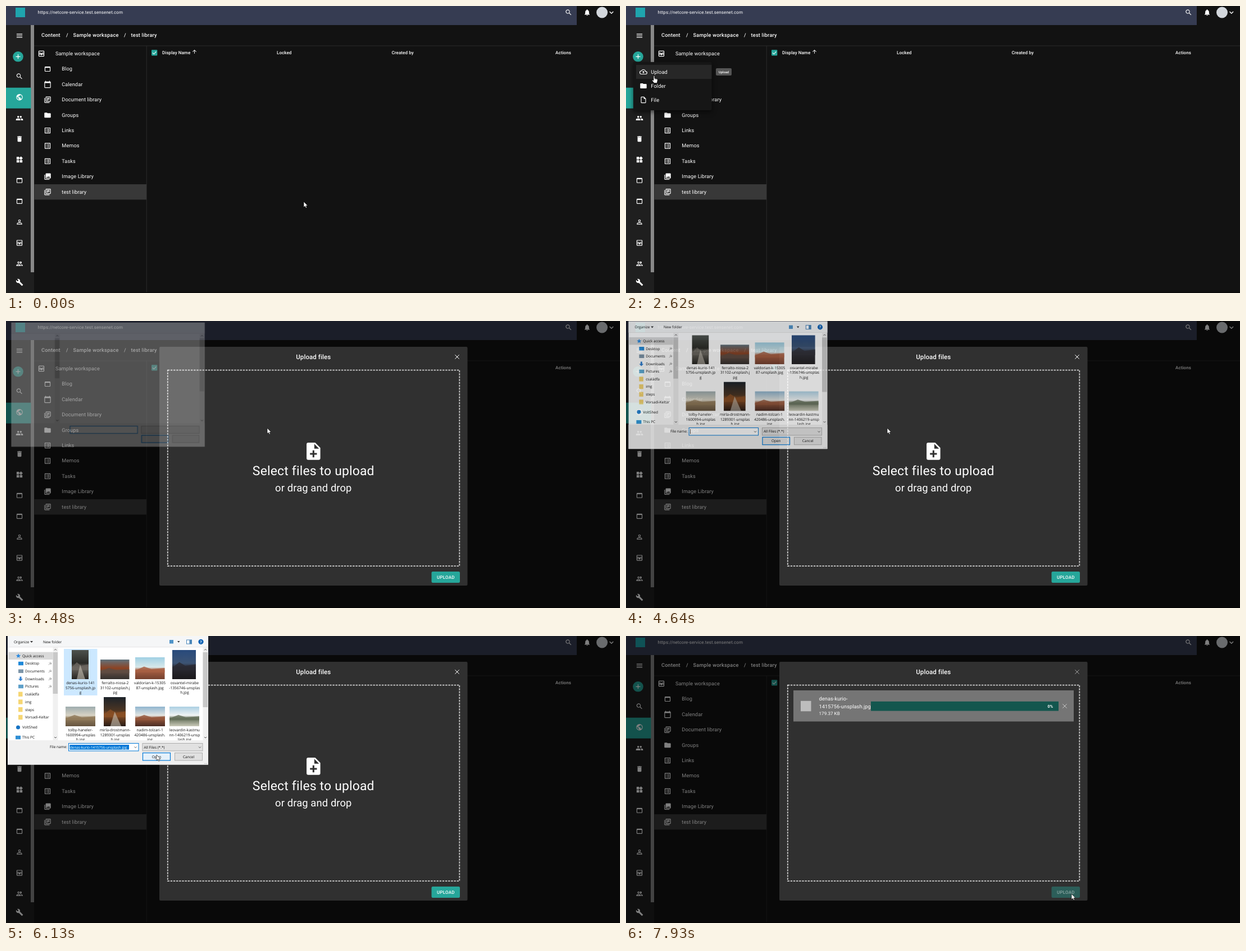
An HTML page for the animation above (8 s loop, 1093x512 px).

```html
<!DOCTYPE html>
<html lang="en">
<head>
<meta charset="utf-8">
<title>Upload to library</title>
<style>
  html, body { margin: 0; width: 100%; height: 100%; overflow: hidden; background: #121212; }
  svg { display: block; width: 100vw; height: 100vh; fill: #fff; font-family: Roboto, sans-serif; text-rendering: geometricPrecision; }
  text { white-space: pre; letter-spacing: .009em; }
  .crumb { letter-spacing: .025em; }
  .m { font-weight: 500; }
  .c { text-anchor: middle; }
  .e { text-anchor: end; }
  .line { fill: none; stroke: #fff; }
  #picker text { font-family: "Open Sans", sans-serif; letter-spacing: 0; fill: #111; }
  #menu { filter: drop-shadow(0 3px 4px rgba(0, 0, 0, .6)); }
</style>
</head>
<body>
<svg id="stage" viewBox="0 0 1093 512"></svg>
<script>
const LOOP = 8000;

// --- drawing helpers -------------------------------------------------
const rect = (x, y, w, h, fill, extra = '') =>
  `<rect x="${x}" y="${y}" width="${w}" height="${h}" fill="${fill}" ${extra}/>`;
const text = (x, y, size, str, cls = '', extra = '') =>
  `<text x="${x}" y="${y}" font-size="${size}" class="${cls}" ${extra}>${str}</text>`;
const path = (d, extra = '') => `<path d="${d}" ${extra}/>`;
const line = (d, width = 1, extra = '') => path(d, `class="line" stroke-width="${width}" ${extra}`);
const group = (id, inner, extra = '') => `<g id="${id}" ${extra}>${inner}</g>`;
const cross = (x, y, r, extra = '') =>
  line(`M${x - r} ${y - r}l${2 * r} ${2 * r}m0 ${-2 * r}l${-2 * r} ${2 * r}`, 1, extra);

const shapes = {
  menu: 'M3 6h18v2H3zm0 5h18v2H3zm0 5h18v2H3z',
  search: 'M9.5 3a6.5 6.5 0 0 1 5.2 10.3l5.8 5.7-1.5 1.5-5.7-5.8A6.5 6.5 0 1 1 9.5 3zm0 2a4.5 4.5 0 1 0 0 9 4.5 4.5 0 0 0 0-9z',
  globe: 'M12 2a10 10 0 1 0 0 20 10 10 0 0 0 0-20zm-1 17.9A8 8 0 0 1 4.2 10.200L9 15v1q0 2 2 2zm6.900-2.500q-.5-1.400-1.900-1.400h-1v-3q0-1-1-1H8v-2h2q1 0 1-1V7h2q2 0 2-2v-.4a8 8 0 0 1 2.900 12.800z',
  people: 'M16 5a3 3 0 1 1 0 6 3 3 0 0 1 0-6zM8 5a3 3 0 1 1 0 6 3 3 0 0 1 0-6zm0 8q7 .3 7 3.500V19H1v-2.500Q1 13.300 8 13zm8 0q7 .3 7 3.500V19h-6v-2.500q0-2-2-3.450z',
  trash: 'M6 7h12v12q0 2-2 2H8q-2 0-2-2zM5 4h3.500l1-1h5l1 1H19v2H5z',
  widgets: 'M13 13h8v8h-8zM3 13h8v8H3zM3 3h8v8H3zm13.700-1.300l5.600 5.600-5.600 5.700L11 7.300z',
  pane: 'M5 4h14q2 0 2 2v12q0 2-2 2H5q-2 0-2-2V6q0-2 2-2zm0 4v10h14V8z',
  person: 'M12 4a4 4 0 1 1 0 8 4 4 0 0 1 0-8zm0 2a2 2 0 1 0 0 4 2 2 0 0 0 0-4zm0 7q8 .4 8 4v3H4v-3q0-3.600 8-4zm0 1.900q-6 .4-6 2.100v1h12v-1q0-1.700-6-2.100z',
  inbox: 'M5 3h14q2 0 2 2v14q0 2-2 2H5q-2 0-2-2V5q0-2 2-2zm0 2v4h5a2 2 0 0 0 4 0h5V5zm0 6v2h14v-2h-3.500a4 4 0 0 1-7 0zm0 4v4h14v-4h-5a2 2 0 0 1-4 0z',
  team: 'M9 5a3.500 3.500 0 1 1 0 7 3.500 3.500 0 0 1 0-7zm0 2a1.500 1.500 0 1 0 0 3 1.500 1.500 0 0 0 0-3zm0 6.700q7 .4 7 3.500V19H2v-1.800q0-3.100 7-3.500zM4.300 17h9.400Q9 14.500 4.300 17zM15 5a3.500 3.500 0 1 1-1.500 6.600q2-3.100 0-6.200zm1 8.800q6 .8 6 3.400V19h-4v-1.800q0-2-2-3.400z',
  wrench: 'M22.700 19l-9.100-9.100q1.300-4-1.500-6.900Q8.800 0 4.700 1.700L9 6 6 9 1.600 4.700Q0 8.800 2.900 12.100q2.900 2.800 6.900 1.500l9.100 9.100q.7.600 1.400 0l2.300-2.300q.7-.7.100-1.400z',
  bell: 'M10 20h4q0 2-2 2t-2-2zm8-9v5l2 2v1H4v-1l2-2v-5q0-5 4.500-6.300V4a1.500 1.500 0 0 1 3 0v.7Q18 6 18 11z',
  calendar: 'M5 1h2v2h10V1h2v2h1q2 0 2 2v16q0 2-2 2H4q-2 0-2-2V5q0-2 2-2h1zM4 8v13h16V8z',
  books: 'M2 6h2v14h14v2H4q-2 0-2-2zm6-4h12q2 0 2 2v12q0 2-2 2H8q-2 0-2-2V4q0-2 2-2zm0 2v12h12V4zm2 2h8v2h-8zm0 3h8v2h-8zm0 3h4v2h-4z',
  folder: 'M4 4h6l2 2h8q2 0 2 2v10q0 2-2 2H4q-2 0-2-2V6q0-2 2-2z',
  list: 'M4 3h16q1 0 1 1v16q0 1-1 1H4q-1 0-1-1V4q0-1 1-1zm1 2v14h14V5zm2 2h2v2H7zm4 0h6v2h-6zm-4 4h2v2H7zm4 0h6v2h-6zm-4 4h2v2H7zm4 0h6v2h-6z',
  images: 'M2 6h2v14h14v2H4q-2 0-2-2zm6-4h12q2 0 2 2v12q0 2-2 2H8q-2 0-2-2V4q0-2 2-2zm3 10l-3 4h12l-4-5-3 3.700z',
  up: 'M12 4l8 8-1.400 1.400L13 7.800V20h-2V7.800l-5.600 5.600L4 12z',
  cloud: 'M6 20a6 6 0 0 1-.6-12 7.500 7.500 0 0 1 14 2A5 5 0 0 1 19 20zm0-2h13a3 3 0 0 0 .2-6l-1.500-.1-.3-1.500A5.500 5.500 0 0 0 7.100 9l-.5.900-1 .1A4 4 0 0 0 6 18zm2-5l4-4 4 4h-2.500v3h-3v-3z',
  file: 'M6 2h8l6 6v12q0 2-2 2H6q-2 0-2-2V4q0-2 2-2zm0 2v16h12V9h-5V4z',
  addFile: 'M6 2h8l6 6v12q0 2-2 2H6q-2 0-2-2V4q0-2 2-2zm7 1.500V9h5.500zM11 11v3H8v2h3v3h2v-3h3v-2h-3v-3z'
};
const icon = (name, cx, cy, size = 13.7, extra = '') =>
  `<path d="${shapes[name]}" fill-rule="evenodd" transform="translate(${cx - size / 2} ${cy - size / 2}) scale(${size / 24})" ${extra}/>`;

// --- page ------------------------------------------------------------
function page() {
  const rail = ['people', 'trash', 'widgets', 'pane', 'pane', 'person', 'inbox', 'team'];
  const tree = [['pane', 'Blog'], ['calendar', 'Calendar'], ['books', 'Document library'], ['folder', 'Groups'],
    ['list', 'Links'], ['list', 'Memos'], ['list', 'Tasks'], ['images', 'Image Library'], ['books', 'test library']];
  const columns = [[278, 'Display Name'], [482, 'Locked'], [686.5, 'Created by'], [978, 'Actions']];
  const crumbs = [[63, 'Content'], [107, '/'], [119.5, 'Sample workspace'], [210, '/'], [222.5, 'test library']];
  return rect(0, 0, 1093, 512, '#121212') + rect(0, 0, 1016, 34, '#363c52') + rect(0, 34, 50, 478, '#1f1f1f') +
    rect(44, 34, 6, 441, '#888') + rect(17, 3, 17, 17, '#1fa5ae') +
    text(56.5, 14, 8, 'https://netcore-service.test.sensenet.com') +
    icon('search', 1001.5, 11.5) + icon('bell', 1034.5, 11.5) +
    '<circle cx="1061" cy="11.500" r="10" fill="#d3d7dc"/>' + line('M1074.500 10l3.300 3.300 3.300-3.300', 1.3) +
    crumbs.map(([x, s]) => text(x, 55.3, 9.14, s, 'm crumb')).join('') +
    rect(50, 70.5, 1043, 1, '#2b2b2b') + rect(249.7, 71, 1, 440, '#2b2b2b') + rect(50, 510.5, 1043, 1, '#080808') +
    icon('menu', 24, 53) + rect(0, 72, 44.5, 37, '#333', 'id="addHover"') +
    '<circle cx="21.500" cy="90.300" r="9.300" fill="#26a69a"/>' + line('M17.500 90.300h8m-4-4v8', 1.2) +
    icon('search', 24, 125.5) + rect(0, 145.7, 44.5, 37, '#26a69a') + icon('globe', 24, 162.7) +
    rail.map((name, i) => icon(name, 24, 200 + i * 37.1)).join('') + icon('wrench', 24, 493) +
    rect(50.5, 318, 199.5, 27.4, '#383838') + icon('inbox', 63, 85) + text(88, 88, 9.2, 'Sample workspace') +
    tree.map(([name, s], i) => icon(name, 74, 112.5 + i * 27.4) + text(99.3, 115.4 + i * 27.4, 9.2, s)).join('') +
    rect(259, 78.3, 10.3, 10.3, '#26a69a', 'rx="1"') + line('M261 83.500l2.300 2.300 4-4.500', 1.1) +
    icon('up', 335.5, 81.5, 10.5) +
    columns.map(([x, s]) => text(x, 86.4, 8, s, 'm')).join('');
}

const tooltip = (id, x, y, w, label) =>
  group(id, rect(x, y, w, 13, '#555', 'rx="2"') + text(x + w / 2, y + 8.6, 5.7, label, 'm c'));

function menu() {
  const rows = [['cloud', 'Upload'], ['folder', 'Folder'], ['file', 'File']];
  return rect(13, 100, 139.5, 86, '#161616', 'rx="2"') + rect(18, 105, 134.5, 25, '#272727', 'id="menuHover"') +
    rows.map(([name, s], i) => icon(name, 31, 117.5 + i * 25) + text(44.3, 120.6 + i * 25, 9.3, s)).join('');
}

function dialog() {
  return rect(273, 46, 548.5, 426, '#303030', 'rx="2"') + text(547.3, 67.8, 11.43, 'Upload files', 'm c') +
    group('dialogClose', cross(803, 64, 3.7)) +
    rect(287.8, 87.5, 519.5, 349.5, 'none', 'stroke="#d0d0d0" stroke-width="1.750" stroke-dasharray="3.400 1.750"') +
    group('prompt', icon('addFile', 547.3, 232.4, 36.8) +
      text(547.3, 275.4, 22.85, 'Select files to upload', 'c') + text(547.3, 303.7, 18.28, 'or drag and drop', 'c')) +
    group('queued', rect(298, 97, 499, 43, '#757575') + rect(311, 109, 18.5, 18.5, '#bdbdbd') +
      text(343.5, 117, 9.2, 'denas-kurio-1415756-unsplash.jpg') + text(343.5, 130, 8, '179.37 KB') + cross(781, 118.5, 3.7)) +
    group('sending', rect(298, 97, 499, 55.5, '#757575') + rect(311, 115.8, 18.5, 18.5, '#bdbdbd') +
      text(343.5, 115.4, 9.2, 'denas-kurio-') + text(343.5, 129, 9.2, '1415756-unsplash.jpg') +
      text(343.5, 141.2, 8, '179.37 KB') + rect(436, 116.8, 334, 16.8, '#13564e') +
      text(755.3, 127.7, 7.2, '0%', 'c', 'font-weight="700"') + cross(781, 125, 3.7, 'opacity=".6"')) +
    rect(757.5, 447, 50.5, 20, '#26a69a', 'id="sendButton" rx="2.300"') +
    text(782.8, 459.7, 8, 'UPLOAD', 'm c crumb', 'id="sendLabel"');
}

// --- file picker -----------------------------------------------------
const photos = [
  { box: [117, 25, 30, 52], tones: ['#4d524c', '#2b2c27', '#6b675f', '#24231f'], name: ['denas-kurio-141', '5756-unsplash.jp', 'g'] },
  { box: [168, 42, 51.5, 35], tones: ['#60727c', '#8d4222', '#5f4c42', '#35302e'], name: ['ferralto-niosa-2', '31102-unsplash.j', 'pg'] },
  { box: [230, 38, 52.5, 39], tones: ['#a0d0e4', '#d7e8ea', '#a85f43', '#74412f'], name: ['valdorian-k-15305', '87-unsplash.jpg', ''] },
  { box: [296, 25, 42, 52], tones: ['#284a7c', '#3d5474', '#2a2a32', '#1b191b'], name: ['osvantel-mirabe', '-1356746-unsplas', 'h.jpg'] },
  { box: [106, 126, 53, 35], tones: ['#9eacae', '#d8d3c4', '#917b5b', '#655440'], name: ['tolby-haneler-', '1600994-unsplas', 'h.jpg'] },
  { box: [174, 109, 39, 52], tones: ['#1d232a', '#4b3523', '#8a4f25', '#271b15'], name: ['mirla-drostmann-', '1289301-unsplas', 'h.jpg'] },
  { box: [230, 126, 53, 35], tones: ['#90b5cf', '#e4e6e2', '#96583c', '#4a2c24'], name: ['nadim-tolzari-1', '420486-unsplash.', 'jpg'] },
  { box: [291, 126, 53, 35], tones: ['#abcfe2', '#f1f4f4', '#65705a', '#c9c9b8'], name: ['leovardin-kastmu', 'nn-1406219-unsp', 'lash.jpg'] }
];

function photo({ box: [x, y, w, h], tones, name }, i) {
  const cx = 132.5 + (i % 4) * 61.8, top = i < 4 ? 86 : 170;
  const stops = tones.map((c, k) => `<stop offset="${[0, .45, .6, 1][k]}" stop-color="${c}"/>`).join('');
  return `<linearGradient id="tone${i}" x2="0" y2="1">${stops}</linearGradient>` + rect(x, y, w, h, `url(#tone${i})`) +
    path(`M${x} ${y + h * .6}l${w * .3} ${-h * .18} ${w * .25} ${h * .12} ${w * .45} ${-h * .05}v${h * .2}H${x}z`, `fill="${tones[2]}" opacity=".8"`) +
    (i % 5 ? '' : path(`M${x + w * .5} ${y + h * .5}l${w * .3} ${h * .5}h${-w * .5}z`, 'fill="#c5bfb2" opacity=".6"')) +
    name.map((s, k) => text(cx, top + k * 8.5, 6.7, s, 'c')).join('');
}

const chevron = (x, y, d = 1, color = '#444') => line(`M${x - 2} ${y - d}l2 ${2 * d} 2 ${-2 * d}`, .9, `style="stroke:${color}"`);

function picker() {
  const places = [['Quick access', '#2d8be0', 35.3], ['Desktop', '#1e88d8', 49], ['Documents', '#7d95a8', 62.7], ['Downloads', '#2f7fd0', 76.4],
    ['Pictures', '#5d9fc9', 90], ['családfa', '#f6d673', 103.8], ['img', '#f6d673', 117.5], ['steps', '#f6d673', 131.2],
    ['Vorsadi-Keltar', '#f6d673', 145], ['VoltShed', '#1673c4', 163], ['This PC', '#2f8fd4', 181]];
  const place = ([s, color, y], i) => {
    const inset = i > 0 && i < 9 ? 34 : 29;
    const mark = i === 9 ? `<circle cx="21.500" cy="${y}" r="3.500" fill="${color}"/>`
      : i === 0 ? path(`M22 ${y - 4}l1.200 2.800 3 .2-2.300 1.900.8 2.900-2.700-1.600-2.700 1.600.8-2.900-2.300-1.900 3-.2z`, `fill="${color}"`)
      : i === 3 ? path(`M24.500 ${y - 4}h3v4h2.500l-4 4-4-4h2.500z`, `fill="${color}"`)
      : rect(inset - 12, y - (i > 4 && i < 9 ? 4.2 : 3.2), i > 4 && i < 9 ? 7.5 : 9, i > 4 && i < 9 ? 8.4 : 6.5, color);
    const pin = i > 0 && i < 5 ? line(`M76 ${y + 2.500}l2-2m-1-2l3 3m-1.500-4l2.500 2.500-2 1`, 1, 'style="stroke:#8a8a8a"') : '';
    return mark + text(inset, y + 2.3, 6.5, s) + pin;
  };
  const frame = rect(3, 0, 357, 229.5, '#fff') + rect(3, 0, 357, 20, '#f5f6f7') + rect(3, 19.5, 357, .7, '#ddd') +
    rect(83.5, 20, 9, 166, '#f0f0f0') + rect(83.5, 29, 8.5, 74, '#c8c8c8') + chevron(88, 24.5, -1) + chevron(88, 181) +
    rect(350.5, 20, 9, 166, '#f0f0f0') + rect(350.5, 29, 8.5, 98, '#c8c8c8') + chevron(355, 24.5, -1) + chevron(355, 181) +
    rect(3, 186, 357, 43.5, '#f0f0f0') + rect(111.5, 191.5, 124.5, 13.5, '#fff', 'stroke="#0078d7"') +
    rect(243, 191.5, 107, 13.5, '#e1e1e1', 'stroke="#adadad"') +
    rect(243.5, 208.5, 49, 13.5, '#e1e1e1', 'id="openButton" stroke="#0078d7" stroke-width="1.200"') +
    rect(300.5, 208.5, 49, 13.5, '#e1e1e1', 'stroke="#adadad"');
  const content = text(14, 12.8, 6.5, 'Organize') + path('M43 9h5l-2.500 3z', 'fill="#333"') + text(66, 12.8, 6.5, 'New folder') +
    rect(291, 7, 7, 6.5, '#4f93c8') + path('M305 9h4.500l-2.200 2.800z', 'fill="#333"') +
    rect(321.5, 7, 9, 7, '#fff', 'stroke="#4784b8"') + rect(326.5, 7, 4, 7, '#4784b8') +
    '<circle cx="347" cy="10.300" r="4.600" fill="#0e63b5"/>' + text(347, 12.8, 6.5, '?', 'c', 'style="fill:#fff;font-weight:700"') +
    rect(4, 28.6, 79, 13.5, '#d9d9d9') + `<g clip-path="url(#listing)">` + places.map(place).join('') +
    rect(164.5, 23, 59.5, 83, '#e5f3ff', 'id="hoverCell"') + rect(103, 23, 59.5, 83, '#e5f3ff', 'id="firstCell"') +
    photos.map(photo).join('') + '</g>' +
    text(109, 200.3, 6.5, 'File name:', 'e') + rect(113.7, 194, .7, 8.5, '#000', 'id="caret"') +
    group('fileName', rect(113.5, 194, 105.5, 8.7, '#0078d7') +
      text(114, 200.7, 6.3, 'denas-kurio-1415756-unsplash.jpg', '', 'style="fill:#fff"')) + chevron(230.5, 198.5) +
    text(245.5, 200.5, 6.5, 'All Files (*.*)') + chevron(345, 198.5) +
    text(268, 217.7, 6.5, 'Open', 'c') + text(325, 217.7, 6.5, 'Cancel', 'c') +
    [0, 1, 2].map(i => rect(357 - i * 2, 227, 1, 1, '#aaa')).join('');
  return '<clipPath id="listing"><rect x="3" y="20" width="347" height="166"/></clipPath>' + frame + group('pickerContent', content);
}

const pointer = group('arrow', path('M0 0v10l2.300-2.100 1.500 3.400 1.700-.7L4 7.300h3z', 'stroke="#000" stroke-width=".6"')) +
  group('hand', path('M-1 1q1-1.600 2 0v4l4 1q1.500.5 1.300 2l-1 5.500H0l-3.200-4.200q-.5-1.400.7-1.600L-1 9z', 'stroke="#000" stroke-width=".7"') +
    line('M1.800 7.500v-1.600m1.900 1.900v-1.500', .5, 'style="stroke:#000"'));

document.getElementById('stage').innerHTML = page() + group('menu', menu()) +
  tooltip('tipAdd', 39, 84, 32, 'Add new') + tooltip('tipUpload', 160, 111, 28, 'Upload') + tooltip('tipFolder', 160, 136, 28, 'Folder') +
  group('backdrop', rect(0, 0, 1093, 512, '#000', 'fill-opacity=".5"')) + group('dialog', dialog()) +
  group('picker', picker()) + group('cursor', pointer);

// --- timing ----------------------------------------------------------
const bursts = [[70, 860, 12], [960, 960, 1], [1140, 1210, 2], [1600, 2370, 11], [2450, 2620, 3], [2840, 3600, 11],
  [3700, 4320, 9], [4480, 5190, 9], [5290, 5290, 1], [5510, 6300, 11], [6380, 7150, 11], [7690, 7690, 1], [7830, 7930, 3]];
const ticks = [0, ...bursts.flatMap(([a, b, n]) =>
  Array.from({ length: n }, (_, i) => Math.ceil((a + (b - a) * i / Math.max(1, n - 1)) / 10) * 10))];

const track = [[0, 530, 349], [70, 522, 344], [430, 230, 195], [790, 20, 94], [860, 15, 91], [960, 18, 92], [1830, 18, 92],
  [2220, 48, 140], [2370, 50, 143], [2450, 50, 124], [2840, 50, 124], [2920, 70, 128], [3450, 440, 182], [3600, 460, 184],
  [4320, 468, 184], [4480, 465, 191], [4750, 465, 191], [5110, 214, 76], [5190, 143, 66], [5290, 142, 67], [5510, 142, 67],
  [5990, 268, 212], [6220, 268, 212], [6300, 354, 231], [6380, 480, 310], [6540, 740, 472], [6620, 765, 484],
  [6930, 788, 458], [7150, 789, 453], [7690, 790, 453], [7830, 793, 460], [LOOP, 793, 460]];

const ramp = (t, a, b) => Math.min(1, Math.max(0, (t - a) / (b - a)));
const within = (t, a, b = LOOP) => t >= a && t < b ? 1 : 0;
const el = id => document.getElementById(id);
const set = (id, name, value) => el(id).setAttribute(name, value);
const fade = (id, value) => { el(id).style.opacity = value; };

function position(t) {
  const i = Math.max(1, track.findIndex(([time]) => time > t));
  const [t0, x0, y0] = track[i - 1], [t1, x1, y1] = track[i], k = ramp(t, t0, t1);
  return `${x0 + (x1 - x0) * k} ${y0 + (y1 - y0) * k}`;
}

function draw(t) {
  set('cursor', 'transform', `translate(${position(t)})`);
  const pointing = within(t, 960, 2900) || within(t, 3250, 4480) || within(t, 6900, 7830);
  fade('hand', pointing);
  fade('arrow', 1 - pointing);

  fade('addHover', within(t, 780, 1600));
  fade('tipAdd', ramp(t, 1070, 1210) * (1 - ramp(t, 1560, 1700)));
  fade('menu', ramp(t, 1560, 1800) * (1 - ramp(t, 2800, 3000)));
  fade('menuHover', within(t, 2130));
  set('menuHover', 'y', within(t, 2130, 2450) ? 130 : 105);
  fade('tipFolder', ramp(t, 2280, 2370) * (1 - ramp(t, 2440, 2610)));
  fade('tipUpload', ramp(t, 2440, 2610) * (1 - ramp(t, 2800, 2950)));

  const shown = ramp(t, 2880, 3150);
  fade('backdrop', shown);
  fade('dialog', shown);
  fade('prompt', within(t, 0, 6610));
  fade('queued', within(t, 6610, 7830));
  const sending = within(t, 7830);
  fade('sending', sending);
  fade('dialogClose', sending ? .55 : 1);
  set('sendButton', 'fill', sending ? '#2c5e59' : '#26a69a');
  fade('sendLabel', sending ? .45 : 1);

  const open = ramp(t, 4430, 4600) * (1 - ramp(t, 6440, 6565)), scale = .95 + .05 * open;
  fade('picker', open);
  set('picker', 'transform', `translate(181 78) scale(${scale}) translate(-181 -78)`);
  fade('pickerContent', within(t, 4560));
  fade('hoverCell', within(t, 5000, 5190));
  fade('firstCell', within(t, 5190));
  set('firstCell', 'fill', t < 5510 ? '#e5f3ff' : '#cce8ff');
  fade('caret', within(t, 0, 5510));
  fade('fileName', within(t, 5510));
  set('openButton', 'fill', within(t, 5950, 6300) ? '#e5f1fb' : '#e1e1e1');
}

let start;
function frame(now) {
  start ??= now;
  const t = (now - start) % LOOP;
  draw(ticks.findLast(tick => tick <= t));
  requestAnimationFrame(frame);
}
draw(0);
requestAnimationFrame(frame);
</script>
</body>
</html>
```
